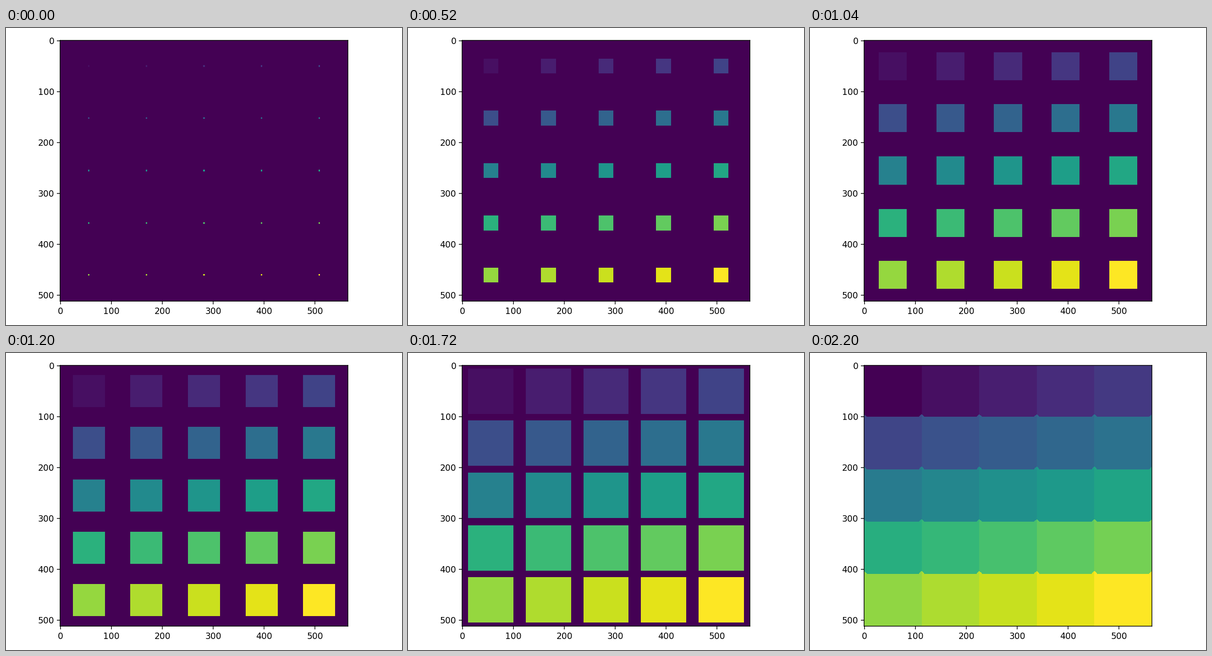
Write a matplotlib script that moves like this. It is 864 by 648 pixels and loops after 2240 ms.

```python
import numpy as np
import matplotlib.pyplot as plt
from matplotlib.animation import FuncAnimation

ROWS, COLS = 512, 565
FRAMES, INTERVAL = 56, 40


def seed_labels():
    """Place a 5 x 5 grid of seeds labelled 1 to 25."""
    grid = np.zeros((ROWS, COLS), dtype=int)
    ys = np.linspace(50, 460, 5).round().astype(int)
    xs = np.linspace(56, 508, 5).round().astype(int)
    grid[np.ix_(ys, xs)] = np.arange(1, 26).reshape(5, 5)
    return grid


def grow(grid):
    """Spread labels by one cell into empty space; the highest label wins."""
    p = np.pad(grid, 1)
    wide = np.maximum(np.maximum(p[:, :-2], p[:, 1:-1]), p[:, 2:])
    spread = np.maximum(np.maximum(wide[:-2], wide[1:-1]), wide[2:])
    return np.where(grid == 0, spread, grid)


states = [grow(seed_labels())]
while len(states) < FRAMES:
    states.append(grow(states[-1]))

plt.rcParams["font.family"] = "DejaVu Sans"
fig, ax = plt.subplots(figsize=(6.4, 4.8), dpi=135)
image = ax.imshow(states[0], cmap="viridis", interpolation="nearest")
fig.tight_layout()


def update(i):
    image.set_data(states[i])
    image.autoscale()
    return [image]


anim = FuncAnimation(fig, update, frames=FRAMES, interval=INTERVAL,
                     repeat=True, repeat_delay=0)
plt.show()
```
